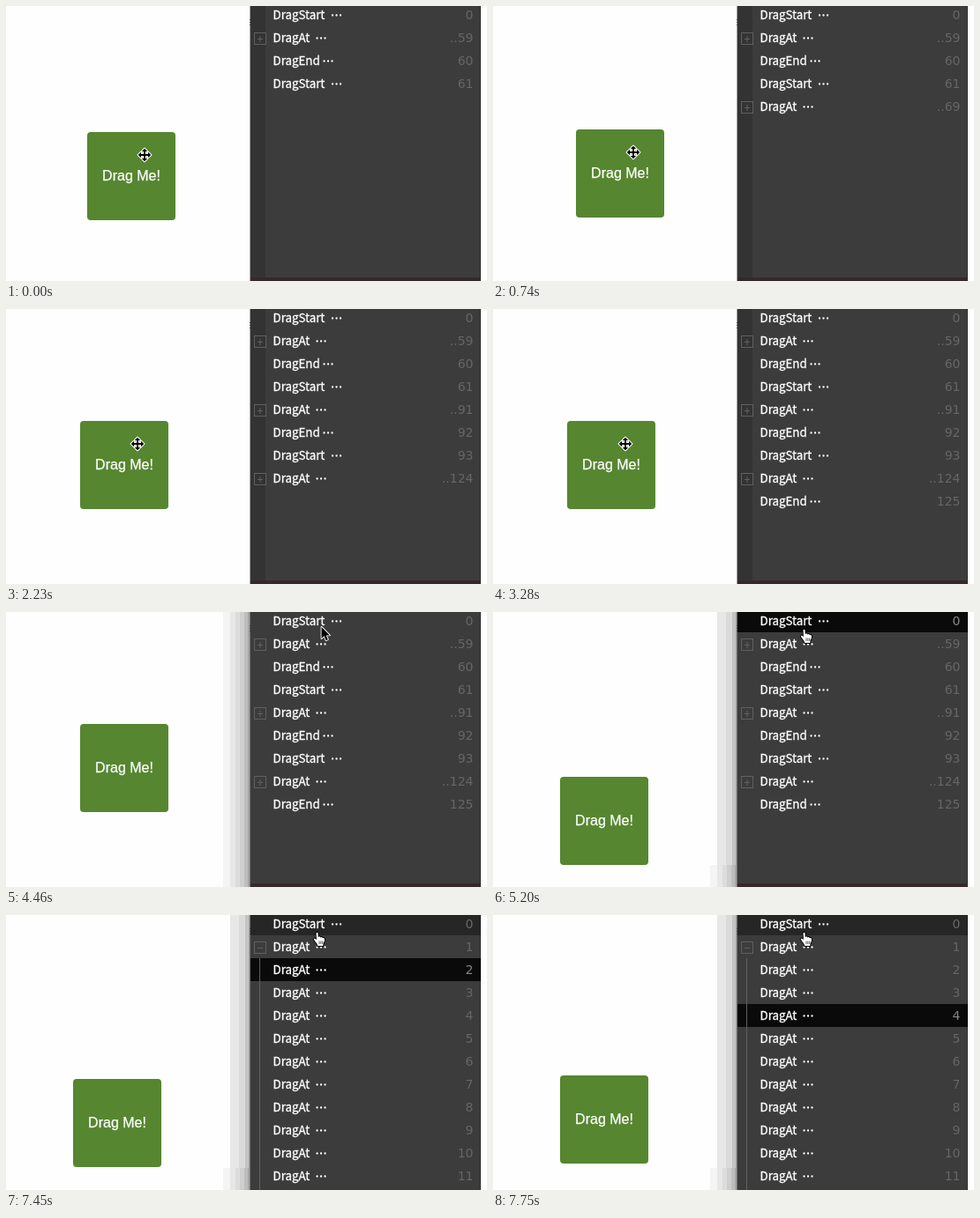
Animation of 545 by 312 pixels, one loop 8000 ms. Source, as an HTML page with a canvas:

```html
<!DOCTYPE html>
<html lang="en">
<head>
<meta charset="utf-8">
<title>Drag event log</title>
<style>
html, body { margin: 0; width: 545px; height: 312px; overflow: hidden; background: #fefefe; }
canvas { display: block; }
</style>
</head>
<body>
<canvas id="stage" width="545" height="312"></canvas>
<script>
const ctx = document.getElementById('stage').getContext('2d');
const LOOP = 8000;
const ROW = 26;
const PANEL = 277, PANEL_END = 538;
const LABEL_FONT = '500 13.3px "Noto Sans CJK JP", "Noto Sans CJK SC", "Noto Sans", sans-serif';
const DOTS_AT = { DragStart: 370, DragAt: 352.5, DragEnd: 360.5 };

const mix = (a, b, p) => Math.round(a + (b - a) * p);
const stepOf = (t, times) => times.filter(s => t >= s).length;

const FIRST_DRAG = [600, 750, 890, 1040];
const SECOND_DRAG = [1930, 2080, 2230, 2380];
const PROGRESS = [0, 0.25, 0.6, 1, 1];
const POINTER_PATH = [[150, 153], [163, 141], [197, 116], [247, 87],
  [302, 58], [346, 36], [368, 21], [357, 16]];

function rect(x, y, w, h, color) {
  ctx.fillStyle = color;
  ctx.fillRect(x, y, w, h);
}

function boxAt(t) {
  if (t >= 7750) return [76, 182];
  if (t >= 7600) return [76, 184];
  if (t >= 7450) return [76, 186];
  if (t >= 5200) return [76, 187];
  if (t >= 1930) {
    const p = PROGRESS[stepOf(t, SECOND_DRAG)];
    return [mix(100, 84, p), mix(132, 127, p)];
  }
  const p = PROGRESS[stepOf(t, FIRST_DRAG)];
  return [mix(92, 100, p), mix(143, 132, p)];
}

function rowsAt(t) {
  if (t >= 6700) {
    const rows = [['DragStart', '0']];
    for (let i = 1; i < 12; i++) rows.push(['DragAt', String(i), i === 1 ? '-' : '']);
    return rows;
  }
  const rows = [['DragStart', '0'], ['DragAt', '..59', '+'], ['DragEnd', '60'], ['DragStart', '61']];
  const drag = (times, from, to) => {
    const k = stepOf(t, times);
    if (k > 0) rows.push(['DragAt', '..' + mix(from, to, PROGRESS[k]), '+']);
    if (k === times.length) rows.push(['DragEnd', String(to + 1)]);
  };
  drag(FIRST_DRAG, 62, 91);
  if (t >= 1630) rows.push(['DragStart', '93']);
  drag(SECOND_DRAG, 94, 124);
  return rows;
}

function selectedAt(t) {
  if (t < 5200) return -1;
  if (t < 6250) return 0;
  return 1 + stepOf(t, [7450, 7600, 7750]);
}

function drawBox([x, y]) {
  ctx.fillStyle = '#568630';
  ctx.beginPath();
  ctx.roundRect(x, y, 100, 100, 4);
  ctx.fill();
  ctx.fillStyle = '#fff';
  ctx.strokeStyle = '#fff';
  ctx.lineWidth = 0.25;
  ctx.font = '16px "Liberation Sans", Arial, sans-serif';
  ctx.textAlign = 'center';
  ctx.fillText('Drag Me!', x + 50, y + 55);
  ctx.strokeText('Drag Me!', x + 50, y + 55);
}

function drawShadow(t) {
  if (t < 4460) return;
  const bands = [[246, '#f4f4f4'], [254, '#e7e7e7'], [260, '#dcdcdc'],
    [265, '#cecece'], [270, '#bdbdbd'], [274, '#a6a6a6']];
  for (const [x, color] of bands) rect(x, 0, PANEL - x, 312, color);
  if (t < 5200) return;
  rect(246, 0, 8, 287, '#fefefe');
  rect(254, 0, 10, 287, '#e7e7e7');
  rect(264, 0, 7, 287, '#dadada');
  rect(271, 0, 4, 287, '#c4c4c4');
}

function drawToggle(y, sign, color) {
  ctx.strokeStyle = color;
  ctx.lineWidth = 1;
  ctx.strokeRect(281.5, y - 5.5, 13, 13);
  rect(285, y + 1, 6, 1, color);
  if (sign === '+') rect(287.5, y - 2, 1, 7, color);
}

function drawRow([label, count, toggle], i, selected) {
  const y = 10 + ROW * i;
  ctx.textAlign = 'left';
  ctx.font = LABEL_FONT;
  ctx.fillStyle = ctx.strokeStyle = '#fff';
  ctx.lineWidth = 0.3;
  ctx.fillText(label, 302.5, y + 5);
  ctx.strokeText(label, 302.5, y + 5);
  for (let k = 0; k < 3; k++) {
    ctx.beginPath();
    ctx.arc(DOTS_AT[label] + k * 4.5, y + 0.5, 1.15, 0, 7);
    ctx.fill();
  }
  ctx.font = '14px "DejaVu Sans", sans-serif';
  ctx.textAlign = 'right';
  ctx.fillStyle = selected ? '#858585' : '#666';
  ctx.fillText(count, 529.5, y + 5);
  if (toggle) drawToggle(y, toggle, selected ? '#808080' : '#606060');
}

function drawPanel(t) {
  const selected = selectedAt(t);
  rect(276.5, 0, PANEL_END - 276.5, 312, '#3c3c3c');
  if (t < 4460) rect(PANEL, 0, 17, 312, '#333');
  if (t < 6700) rect(PANEL, 308, PANEL_END - PANEL, 4, '#35292d');
  rect(PANEL_END - 1, 0, 1, 312, '#333');
  for (let y = 15; y < 23; y += 3) rect(276, y, 1, 1, '#444');

  if (t >= 4760) rect(PANEL, 0, PANEL_END - PANEL, 23, '#262626');
  if (selected >= 0) rect(PANEL, ROW * selected - 3, PANEL_END - PANEL, ROW, '#0a0a0a');
  if (t >= 6700) rect(287, 49, 1, 263, '#606060');
  rowsAt(t).forEach((row, i) => drawRow(row, i, i === selected));
}

function shape(points, fill, line, width) {
  ctx.beginPath();
  points.forEach(([x, y]) => ctx.lineTo(x, y));
  ctx.closePath();
  ctx.lineJoin = 'round';
  ctx.lineWidth = width;
  ctx.strokeStyle = line;
  ctx.stroke();
  ctx.fillStyle = fill;
  ctx.fill();
}

function moveCursor() {
  const arm = [[-1, -1], [-1, -4], [-3.2, -4], [0, -7.3], [3.2, -4], [1, -4]];
  const points = [];
  for (let q = 0; q < 4; q++) {
    const c = [1, 0, -1, 0][q], s = [0, 1, 0, -1][q];
    for (const [x, y] of arm) points.push([x * c - y * s, x * s + y * c]);
  }
  shape(points, '#000', '#fff', 2.2);
}

function arrowCursor() {
  shape([[0.5, 1], [0.5, 14], [3.5, 11.2], [5.6, 16.2], [7.8, 15.2], [5.7, 10.4], [9.8, 10.4]],
    '#000', '#fff', 1.8);
}

function handCursor() {
  shape([[3.5, 1.5], [4.5, 0.7], [5.5, 1.5], [5.7, 6], [7.5, 5.3], [8.3, 6.4], [10, 6],
    [10.8, 7.2], [12.3, 7], [13, 8.5], [12.7, 11], [11.5, 13.5], [11.3, 16], [5, 16],
    [4.6, 14], [2.3, 11], [0.7, 8.6], [1.6, 7.5], [3.9, 9]], '#fff', '#000', 1.8);
  for (const x of [6.6, 8.5, 10.4]) rect(x, 10.5, 0.8, 3.5, '#333');
}

function drawCursor(t, [bx, by]) {
  let x = bx + 65, y = by + 26, draw = moveCursor;
  if (t >= 4910) {
    [x, y, draw] = [348, 19, handCursor];
  } else if (t >= 4760) {
    [x, y, draw] = [351, 17, handCursor];
  } else if (t >= 3280) {
    [x, y] = POINTER_PATH[Math.min(7, Math.floor((t - 3280) / 147))];
    if (x > bx + 100 || y < by) draw = arrowCursor;
  }
  ctx.save();
  ctx.translate(x, y);
  draw();
  ctx.restore();
}

function render(t) {
  const box = boxAt(t);
  rect(0, 0, 545, 312, '#fefefe');
  drawShadow(t);
  drawBox(box);
  drawPanel(t);
  drawCursor(t, box);
}

const start = performance.now();
function frame() {
  render((performance.now() - start) % LOOP);
  requestAnimationFrame(frame);
}
frame();
</script>
</body>
</html>
```
